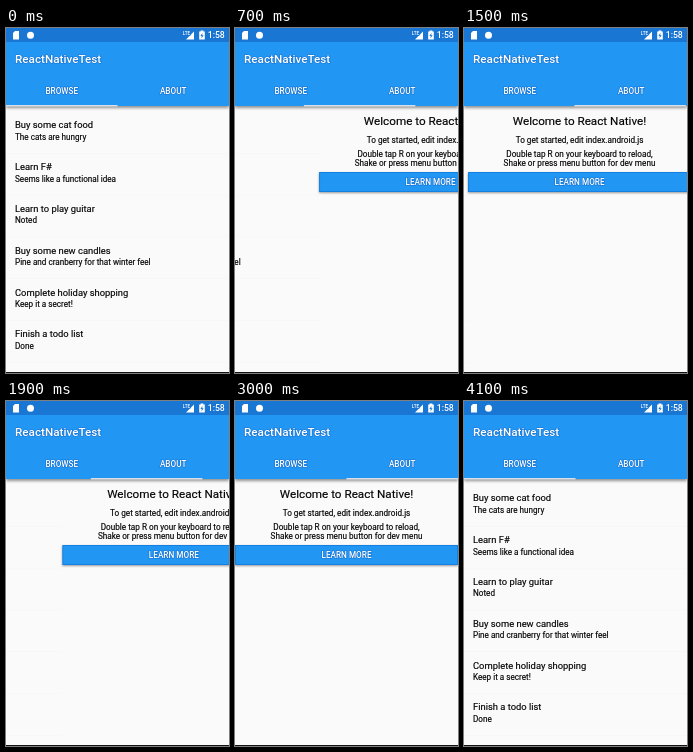
Recreate the animation shown at these times as an HTML page. Size 223 px wide and 345 px high, loop 4.2 s.

```html
<!DOCTYPE html>
<html lang="en">
<head>
<meta charset="utf-8">
<title>Swipeable tabs</title>
<style>
  html, body { margin: 0; width: 100%; height: 100%; overflow: hidden; background: #fafafa; }
  svg { display: block; width: 223px; height: 345px; font-family: Roboto, sans-serif; font-size: 8.2px; }
  text { fill: #000; stroke: #000; stroke-width: .15px; paint-order: stroke; }
  .bar { fill: #2196f3; }
  .medium { font-weight: 500; }
  .white, .white text { fill: #fff; }
  .white text { stroke: #1873d2; stroke-width: 1.2px; }
  .mid { text-anchor: middle; }
  .head { font-size: 11.7px; }
  .item { font-size: 9.4px; }
  .note { font-size: 8.15px; }
  .shadow { filter: drop-shadow(0 2px 1.6px rgba(0, 0, 0, .42)); }
  .raised { filter: drop-shadow(0 1px 1px rgba(0, 0, 0, .4)); }
</style>
</head>
<body>
<svg viewBox="0 0 223 345">
  <rect width="223" height="345" fill="#fafafa"/>

  <g id="browse"></g>

  <g id="about" class="mid">
    <text class="head" x="111.5" y="97">Welcome to React Native!</text>
    <text x="111.5" y="115">To get started, edit index.android.js</text>
    <text x="111.5" y="129">Double tap R on your keyboard to reload,</text>
    <text x="111.5" y="138">Shake or press menu button for dev menu</text>
    <g class="white">
      <rect class="bar raised" x=".5" y="144.5" width="222" height="19" stroke="#1480e2"/>
      <text class="medium" x="111.5" y="157">LEARN MORE</text>
    </g>
  </g>

  <rect class="bar shadow" y="10" width="223" height="68"/>
  <rect width="223" height="14" fill="#1976d2"/>

  <g class="white">
    <path d="M9 3H13V11.4H7V5Z"/>
    <circle cx="24.5" cy="7.3" r="3.5"/>
    <path d="M188 3.5V11.5H180Z"/>
    <text class="medium" x="176.8" y="7" style="font-size:4.6px">LTE</text>
    <path d="M194.6 2.6H197.4V3.6H198.8V11.6H193.2V3.6H194.6Z"/>
    <path d="M196.5 4.8L194.4 8H195.8L195.4 10.6L197.6 7.2H196.2Z" fill="#1976d2"/>
    <text class="medium" x="201.7" y="10.2" style="font-size:8.7px">1:58</text>
    <text class="head medium" x="9" y="35">ReactNativeTest</text>
    <g class="medium mid">
      <text x="55.8" y="66">BROWSE</text>
      <text x="167.2" y="66">ABOUT</text>
    </g>
    <rect id="line" y="77" width="111.5" height="1.5" fill="#d8dfe9"/>
  </g>
  <rect y="344" width="223" height="1" fill="#111"/>
</svg>

<script>
  const WIDTH = 223, LOOP = 4200, STEP = 100, LAG = 25, ROW = 41.8;
  const $ = id => document.getElementById(id);

  const todos = [
    ["Buy some cat food", "The cats are hungry"],
    ["Learn F#", "Seems like a functional idea"],
    ["Learn to play guitar", "Noted"],
    ["Buy some new candles", "Pine and cranberry for that winter feel"],
    ["Complete holiday shopping", "Keep it a secret!"],
    ["Finish a todo list", "Done"]
  ];
  $("browse").innerHTML = todos.map(([title, note], i) => `
    <g transform="translate(0 ${i * ROW})">
      <text class="item" x="9" y="100.4">${title}</text>
      <text class="note" x="9" y="111.8">${note}</text>
      <rect y="125" width="${WIDTH}" height=".6" fill="#f5f5f5"/>
    </g>`).join("");

  const linear = u => u;
  const easeIn = u => u * u;
  const easeOut = u => 1 - (1 - u) ** 2;
  const smooth = u => u * u * (3 - 2 * u);

  // [time, page position, easing towards it]
  const swipes = [
    [0, 0, linear],
    [250, 0, linear],
    [700, .623, smooth],
    [1050, 1, smooth],
    [1400, 1, linear],
    [1500, .982, easeIn],
    [2000, .72, smooth],
    [2300, .72, linear],
    [2400, .843, linear],
    [2650, 1, easeOut],
    [3150, 1, linear],
    [3500, .09, u => (easeIn(u) + u) / 2],
    [3600, 0, easeOut],
    [LOOP, 0, linear]
  ];

  function position(t) {
    const i = Math.max(1, swipes.findIndex(s => s[0] >= t));
    const [t0, p0] = swipes[i - 1];
    const [t1, p1, ease] = swipes[i];
    return p0 + (p1 - p0) * ease((t - t0) / (t1 - t0));
  }

  const shift = (id, x) => $(id).setAttribute("transform", `translate(${x.toFixed(2)} 0)`);

  const start = performance.now();
  function draw() {
    const t = Math.floor((performance.now() - start) % LOOP / STEP) * STEP;
    const p = position(t);
    shift("browse", -p * WIDTH);
    shift("about", (1 - p) * WIDTH);
    // keep the button's shadow from peeking in at the right edge
    $("about").style.visibility = p > 0 ? "visible" : "hidden";
    // the tab line trails slightly behind the pages
    shift("line", position(Math.max(0, t - LAG)) * WIDTH / 2);
    requestAnimationFrame(draw);
  }
  draw();
</script>
</body>
</html>
```
